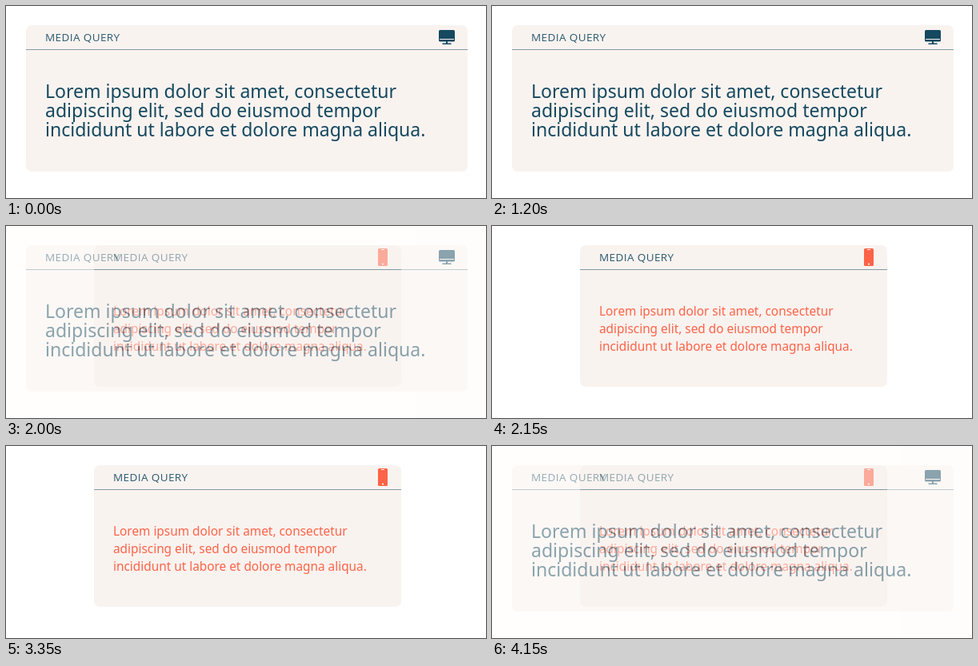
Recreate the animation shown at these times as an HTML page. Size 600x240 px, loop 4300 ms.

```html
<!DOCTYPE html>
<html lang="en">
<head>
<meta charset="utf-8">
<title>Media query</title>
<style>
  html, body { margin: 0; width: 100%; height: 100%; overflow: hidden; background: #fff; }
  svg { display: block; width: 100vw; height: 100vh; }
  .card { fill: #f9f3f0; }
  .rule { stroke: #7f9aa3; }
  .label { font: 400 13.5px "Open Sans", sans-serif; letter-spacing: .4px; fill: #2b5a6e; }
  .copy { font-family: "Noto Sans", sans-serif; }
</style>
</head>
<body>
<svg id="stage" viewBox="0 0 600 240"></svg>
<script>
const NAVY = '#15495f', CORAL = '#ff6347', PAPER = '#f9f3f0';
const HOLD = 2000, MIX = 150, LOOP = 2 * (HOLD + MIX);
const LINES = [
  'Lorem ipsum dolor sit amet, consectetur',
  'adipiscing elit, sed do eiusmod tempor',
  'incididunt ut labore et dolore magna aliqua.'
];

const desktop = `
  <rect x="541" y="30" width="20" height="14.5" rx="1.6" fill="${NAVY}"/>
  <path d="M542 41.5h18" stroke="${PAPER}"/>
  <path d="M551 44v3" stroke="${NAVY}" stroke-width="2"/>
  <path d="M546 47.2h10" stroke="${NAVY}" stroke-width="1.5" stroke-linecap="round"/>`;

const phone = `
  <rect x="465" y="28" width="12" height="22" rx="1.5" fill="${CORAL}"/>
  <path d="M469 29.5h4" stroke="${PAPER}"/>
  <circle cx="471" cy="47.6" r="1.1" fill="${PAPER}"/>`;

function view({ id, x, w, h, size, first, leading, color, icon }) {
  const copy = LINES.map((line, i) =>
    `<text class="copy" x="${x + 24}" y="${first + i * leading}" font-size="${size}" fill="${color}">${line}</text>`);
  return `<g id="${id}">
    <rect class="back" width="600" height="240"/>
    <rect class="card" x="${x}" y="24" width="${w}" height="${h}" rx="7"/>
    <path class="rule" d="M${x} 54.5h${w}"/>
    <text class="label" x="${x + 24}" y="44">MEDIA QUERY</text>
    ${icon}${copy.join('')}
  </g>`;
}

const stage = document.getElementById('stage');
stage.innerHTML =
  view({ id: 'wide', x: 25, w: 552, h: 183, size: 23.05, first: 115, leading: 24, color: NAVY, icon: desktop }) +
  view({ id: 'narrow', x: 110, w: 384, h: 177, size: 15.36, first: 112, leading: 22, color: CORAL, icon: phone });

const narrow = document.getElementById('narrow');
const backs = stage.querySelectorAll('.back');

// Each view holds, then both show at half strength for a moment.
function draw(ms) {
  const t = ms % LOOP;
  const mixing = t % (HOLD + MIX) >= HOLD;
  narrow.setAttribute('opacity', mixing ? 0.5 : t < HOLD ? 0 : 1);
  backs.forEach(b => b.setAttribute('fill', mixing ? '#fffefc' : '#fff'));
}

const start = performance.now();
function tick() {
  draw(performance.now() - start);
  requestAnimationFrame(tick);
}
tick();
</script>
</body>
</html>
```
